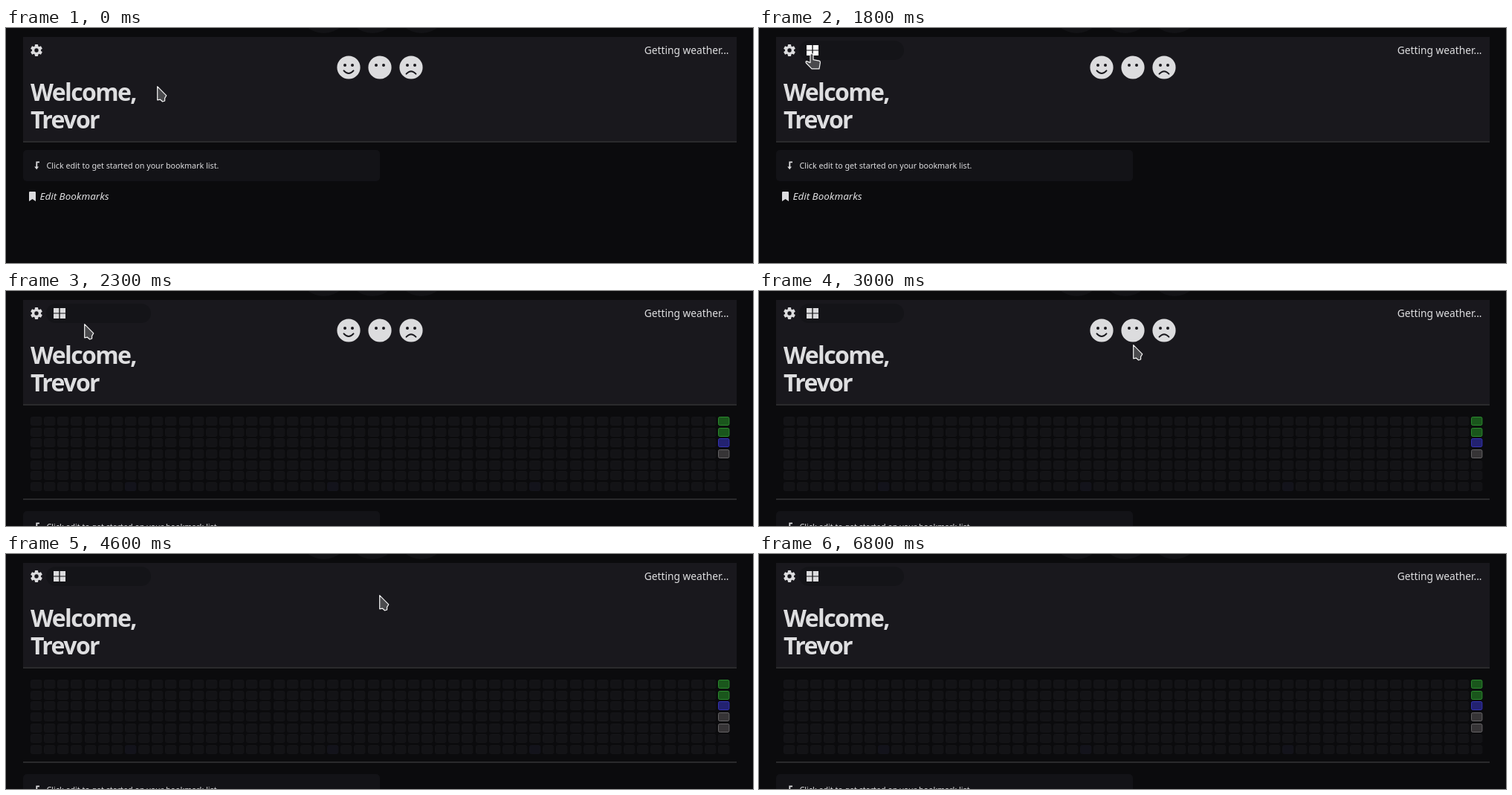
An HTML page that plays this animation: 1005x316 px, repeating every 7000 ms.

```html
<!DOCTYPE html>
<html lang="en">
<head>
<meta charset="utf-8">
<title>Start page</title>
<style>
html, body { margin: 0; width: 100%; height: 100%; overflow: hidden; background: #0b0b0d; }
svg { display: block; width: 100vw; height: 100vh; }
text { font-family: "Noto Sans", "Open Sans", sans-serif; fill: #dedee0; }
.title { font-size: 32px; font-weight: 600; letter-spacing: -1.6px; }
.icon { fill: #dcdcde; }
.panel { fill: #19181d; }
.card { fill: #131317; }
.rule { fill: #2a2a2c; }
.cursor path { fill: #4a4a4d; stroke: #f4f4f4; stroke-width: 1.2; stroke-linejoin: round; }
</style>
</head>
<body>
<svg viewBox="0 0 1005 316">
  <defs>
    <clipPath id="fold"><rect id="foldBox" x="23" y="154" width="960" height="0"/></clipPath>
  </defs>
  <rect width="1005" height="316" fill="#0b0b0d"/>
  <g fill="#131316">
    <circle cx="427.5" cy="-28" r="35"/>
    <circle cx="493" cy="-28" r="35"/>
    <circle cx="559" cy="-28" r="35"/>
  </g>

  <g id="bookmarks">
    <rect class="card" x="23" y="164" width="480" height="42" rx="5"/>
    <path d="M45 180.3H41.3V188" fill="none" stroke="#dcdcde" stroke-width="1.8"/>
    <path class="icon" d="M38.2 186.4H44L41.2 190.3Z"/>
    <text x="54.5" y="189" font-size="10.7">Click edit to get started on your bookmark list.</text>
    <path class="icon" d="M31 221.2Q31 220 32.2 220H38.8Q40 220 40 221.2V233L35.5 230L31 233Z"/>
    <text x="45.5" y="231" font-size="13.45" font-style="italic">Edit Bookmarks</text>
  </g>

  <g id="cells" clip-path="url(#fold)"></g>
  <rect id="foldRule" class="rule" x="23" y="279" width="960" height="2"/>

  <rect class="panel" x="23" y="12" width="960" height="140"/>
  <rect class="rule" x="23" y="152" width="960" height="2"/>
  <rect id="pill" x="54" y="17" width="141" height="26" rx="13" fill="#141418"/>
  <rect id="gearHover" x="28" y="17" width="26" height="26" rx="4" fill="#2b2834"/>
  <g id="gear" class="icon" transform="translate(41 30)">
    <circle r="4.4" fill="none" stroke="#dcdcde" stroke-width="3.4"/>
  </g>
  <path id="tiles" d="M64 23h7.3v6.5H64zM72.7 23H80v6.5H72.7zM64 30.5h7.3V37H64zM72.7 30.5H80V37H72.7z"/>
  <text x="972.5" y="35" font-size="13.75" text-anchor="end">Getting weather...</text>
  <text class="title" x="33" y="98">Welcome,</text>
  <text class="title" x="33" y="135">Trevor</text>
  <g id="faces"></g>

  <g id="arrow" class="cursor"><path d="M.7 .7V18.8L4.6 18.2L7.6 21L10.6 20V16.4L12.8 12.8Z"/></g>
  <g id="hand" class="cursor"><path d="M-2 2Q-2 .6 0 .6Q2 .6 2 2V8.6L10 10.2Q11.6 10.6 11.4 12.5L10 20.8H0L-7.6 13Q-8.6 11.2 -7 10.6L-2 12.6Z"/></g>
</svg>

<script>
const LOOP = 7000, STEP = 100;
const $ = id => document.getElementById(id);

function add(parent, tag, attrs) {
  const el = document.createElementNS("http://www.w3.org/2000/svg", tag);
  for (const k in attrs) el.setAttribute(k, attrs[k]);
  return parent.appendChild(el);
}

// Cursor path: time, x, y
const route = [
  [0, 203, 78], [300, 142, 60], [600, 58, 38], [800, 38, 30], [1200, 38, 30],
  [1500, 76, 35], [1700, 75, 34], [1800, 71, 34], [2000, 71, 34],
  [2300, 105, 44], [2500, 285, 72], [2700, 473, 87], [3000, 503, 72],
  [3200, 502, 55], [4600, 502, 55], [4800, 388, 22], [4900, 400, 80],
  [5000, 470, 104], [5100, 555, 85], [5200, 564, 0], [5300, 562, 50],
  [5500, 471, 27]
];
const peek = [[6400, 3, -16], [6600, 8, -10], [6800, 5, -22]];

const gear = $("gear"), cells = $("cells"), faces = $("faces");
for (let a = 0; a < 360; a += 60)
  add(gear, "rect", { x: -2.2, y: -8, width: 4.4, height: 3.6, rx: 0.8, transform: `rotate(${a})` });

const moods = [["#1a561c", "#2b8a2e"], ["#1a561c", "#2b8a2e"], ["#232270", "#3432b4"], ["#363436", "#656365"]];
function cell(col, row, fill, stroke) {
  return add(cells, "rect", {
    x: Math.round(33 + col * 18.14) + 0.5, y: Math.round(168.9 + row * 14.67) + 0.5,
    width: 14.4, height: 11, rx: 1.8, fill, stroke
  });
}
for (let col = 0; col < 52; col++)
  for (let row = 0; row < 7; row++) {
    const blue = row === 6 && col % 15 === 7;
    const [fill, line] = col === 51 && moods[row] || (blue ? ["#13131b", "#14141c"] : ["#131316", "#151518"]);
    cell(col, row, fill, line);
  }
const today = cell(51, 4, ...moods[3]);

const mouths = ["M-6.5 4.4Q0 11.6 6.5 4.4", "", "M-6.4 8.7Q0 1.6 6.4 8.7"];
const discs = mouths.map((d, i) => {
  const g = add(faces, "g", { transform: `translate(${461 + 42 * i} 53)` });
  const disc = add(g, "circle", { r: 15.6 });
  for (const x of [-5, 5]) add(g, "circle", { cx: x, cy: -3, r: 2, fill: "#19181d" });
  if (d) add(g, "path", { d, fill: "none", stroke: "#19181d", "stroke-width": 2, "stroke-linecap": "round" });
  return disc;
});

const ramp = (t, a, b) => Math.min(1, Math.max(0, (t - a) / (b - a)));
const during = (t, a, b) => t >= a && t < b;
const show = (el, on) => el.setAttribute("visibility", on ? "visible" : "hidden");

function along(keys, t) {
  const n = keys.findIndex(k => k[0] > t);
  if (n < 1) return keys[n < 0 ? keys.length - 1 : 0].slice(1);
  const [a, b] = [keys[n - 1], keys[n]], p = ramp(t, a[0], b[0]);
  return [1, 2].map(i => a[i] + (b[i] - a[i]) * p);
}

function draw(t) {
  const onGear = during(t, 700, 1300), onTiles = during(t, 1400, 2100), onFace = during(t, 3200, 3700);
  show($("gearHover"), onGear);

  const pill = ramp(t, 1000, 1300);
  $("pill").setAttribute("width", 141 * pill);
  $("tiles").setAttribute("opacity", pill);
  $("tiles").setAttribute("fill", onTiles ? "#fff" : "#dcdcde");

  const open = 1 - (1 - ramp(t, 1900, 2300)) ** 2;
  $("bookmarks").setAttribute("transform", `translate(0 ${132 * open})`);
  $("foldBox").setAttribute("height", 125 * open);
  $("foldRule").setAttribute("y", 147 + 132 * open);
  show($("foldRule"), open > 0);

  const done = ramp(t, 3500, 3900);
  faces.setAttribute("opacity", 1 - done);
  today.setAttribute("opacity", done);
  discs.forEach((d, i) => d.setAttribute("fill", onFace && i === 1 ? "#fff" : "#dcdcde"));

  const [x, y] = along(t < 6000 ? route : peek, t);
  const hand = onGear || onTiles || onFace;
  const inside = t < 5600 || during(t, 6400, 6800);
  for (const [el, on] of [[$("hand"), hand], [$("arrow"), !hand]]) {
    show(el, on && inside);
    el.setAttribute("transform", `translate(${x} ${y})`);
  }
}

const start = performance.now();
function tick() {
  const t = (performance.now() - start) % LOOP;
  draw(Math.floor(t / STEP) * STEP);
  requestAnimationFrame(tick);
}
tick();
</script>
</body>
</html>
```
